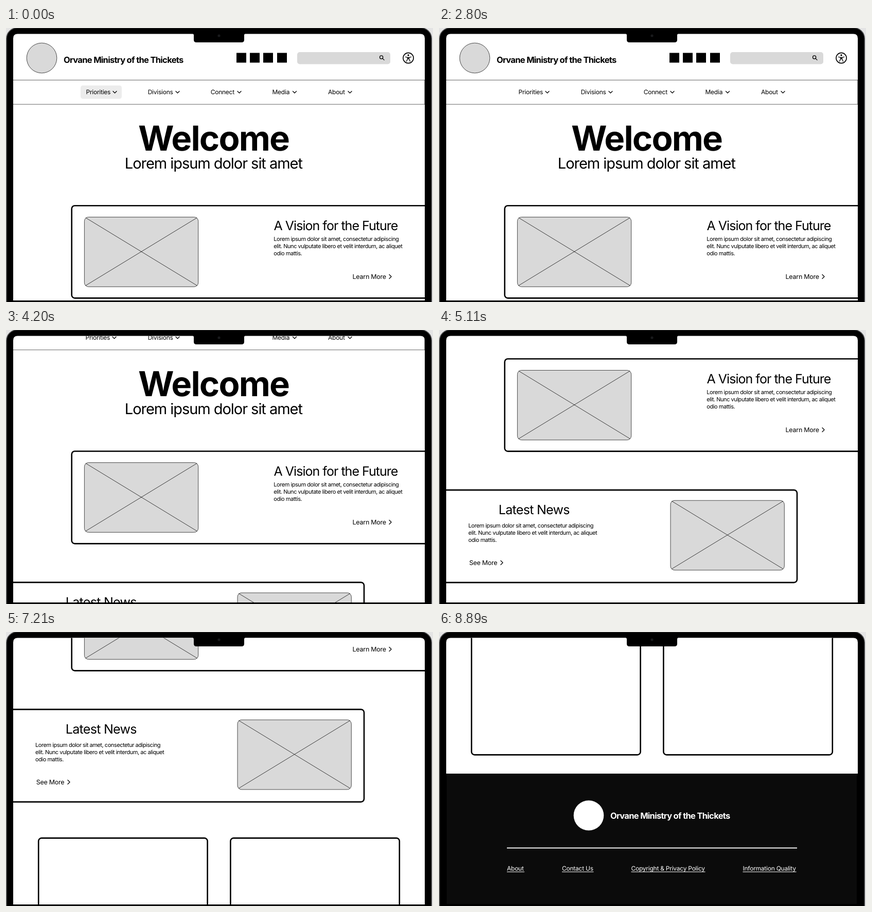
Write an HTML page that moves like this. It is 830 by 534 pixels and loops after 9.38 s.

```html
<!DOCTYPE html>
<html lang="en">
<head>
<meta charset="utf-8">
<title>Wireframe walkthrough</title>
<style>
  html, body { margin: 0; width: 100%; height: 100%; overflow: hidden; background: #e4e4e4; }
  svg { display: block; width: 830px; height: 534px; }
  text {
    font-family: Inter, "Liberation Sans", sans-serif; font-optical-sizing: none;
    text-rendering: geometricPrecision; white-space: pre;
  }
  .line { fill: none; stroke: #000; stroke-width: 1.3; stroke-linecap: round; stroke-linejoin: round; }
  .card { fill: #fff; stroke: #000; stroke-width: 2.6; }
  .thin { fill: #d9d9d9; stroke: #000; stroke-width: .7; }
</style>
</head>
<body>
<svg id="stage" viewBox="0 0 830 534">
  <defs>
    <clipPath id="screen"><path d="M14 531V20Q14 11.5 22.5 11.5H805.5Q814 11.5 814 20V531Z"/></clipPath>
  </defs>
  <rect x="1" y="-.3" width="826.2" height="580" rx="21" fill="#000" stroke="#4a4b4c" stroke-width="1.6"/>
  <g clip-path="url(#screen)">
    <rect x="14" y="11" width="800" height="520" fill="#fff"/>
    <g id="page"></g>
  </g>
  <path d="M363 11H465Q463 11.5 463 14V23Q463 28 458 28H370Q365 28 365 23V14Q365 11.5 363 11Z"/>
  <circle cx="414" cy="15" r="2.6" fill="#191a1c"/>
</svg>
<script>
const LOOP = 9380, TICK = 70;
const NAME = 'Orvane Ministry of the Thickets';
const page = document.getElementById('page');

function add(tag, attrs, parent = page, content = '') {
  const node = document.createElementNS('http://www.w3.org/2000/svg', tag);
  for (const key in attrs) node.setAttribute(key, attrs[key]);
  node.textContent = content;
  parent.appendChild(node);
  return node;
}

function label(x, y, size, content, { track = -.02, weight = 400, fill = '#000', parent = page } = {}) {
  return add('text', {
    x, y, fill, 'font-size': size, 'font-weight': weight, 'letter-spacing': track * size
  }, parent, content);
}

const box = (cls, x, y, width, height, rx) => add('rect', { class: cls, x, y, width, height, rx });
const stroke = (d, parent = page) => add('path', { class: 'line', d }, parent);

function placeholder(x, y) {
  box('thin', x, y, 221.3, 135.8, 8);
  add('path', {
    d: `M${x + 2.3} ${y + 1.2}L${x + 219} ${y + 133.5}M${x + 219} ${y + 1.2}L${x + 2.3} ${y + 133.5}`,
    stroke: '#000', 'stroke-width': .75
  });
}

function paragraph(x, y) {
  ['Lorem ipsum dolor sit amet, consectetur adipiscing',
   'elit. Nunc vulputate libero et velit interdum, ac aliquet',
   'odio mattis.'].forEach((line, i) => label(x, y + 14 * i, 11, line, { track: -.041 }));
}

function more(x, y, content, arrowX) {
  label(x, y, 12.5, content);
  stroke(`M${arrowX} ${y - 8.5}l4 4l-4 4`);
}

function header() {
  add('circle', { class: 'thin', cx: 69.5, cy: 58.5, r: 29.3 });
  label(112, 68, 16.5, NAME, { weight: 700, track: -.042 });
  for (const x of [448, 474, 500, 527]) add('rect', { x, y: 48.5, width: 19, height: 19 });
  add('rect', { x: 566, y: 47, width: 181, height: 23.5, rx: 5, fill: '#d9d9d9' });
  add('circle', { class: 'line', cx: 729.6, cy: 57, r: 3.1 });
  stroke('M732 59.4l3 3');
  add('circle', { class: 'line', cx: 782, cy: 58.5, r: 10.1, style: 'stroke-width:1.6' });
  add('circle', { cx: 782, cy: 53, r: 1.7 });
  stroke('M776.5 56.3l4 1h3l4 -1M780.5 57.5V60.5L778.5 65M783.5 57.5V60.5L785.5 65M782 57.5V60.5');
  add('rect', {
    x: 13.5, y: 101.4, width: 800.4, height: 47.4, fill: 'none', stroke: '#333', 'stroke-width': .75
  });
}

// Each menu item: label, text x, chevron x, and its highlight: in start, in end, out start, out end.
const menu = [
  ['Priorities', 154.5, 210.5, -2, -1, 0, 280],
  ['Divisions', 275.7, 333.5, 350, 560, 840, 1120],
  ['Connect', 397.7, 453.5, 1120, 1330, 1470, 1680],
  ['Media', 517.5, 561, 1610, 1820, 1960, 2170],
  ['About', 626, 668.5, 2240, 2450, 2590, 2800]
].map(([name, x, arrow, ...times]) => {
  const pill = add('rect', {
    x: x - 9.5, y: 112, width: arrow - x + 24, height: 26, rx: 4.5, fill: '#ececec'
  });
  const face = add('g', {});
  label(x, 129.3, 12, name, { parent: face });
  stroke(`M${arrow - 3.5} 123.3l3.5 3.5l3.5 -3.5`, face);
  return { pill, face, times };
});

function content() {
  label(257, 239, 67, 'Welcome', { weight: 700, track: -.027 });
  label(230.8, 274.3, 29, 'Lorem ipsum dolor sit amet', { track: -.036 });

  box('card', 127.7, 346.2, 760, 180.2, 6);
  placeholder(152.4, 368.5);
  label(520.5, 394.3, 25, 'A Vision for the Future', { track: -.039 });
  paragraph(520.3, 415.3);
  more(673.5, 489, 'Learn More', 745);

  box('card', -60, 601.9, 756, 180.2, 6);
  placeholder(450, 622.2);
  label(115.8, 649.3, 25, 'Latest News', { track: -.028 });
  paragraph(57, 675.3);
  more(58.7, 748, 'See More', 120);

  for (const x of [63.2, 436.4]) box('card', x, 852.6, 328.4, 234.8, 6);
}

function footer() {
  const white = { fill: '#fff' };
  add('rect', { x: 14, y: 1124, width: 800, height: 300 });
  add('rect', { x: 15, y: 1124, width: 797, height: 254, fill: '#0b0b0b' });
  add('circle', { cx: 291, cy: 1205.5, r: 29.3, fill: '#fff' });
  label(333, 1211.5, 16.5, NAME, { ...white, weight: 700, track: -.042 });
  add('rect', { x: 132, y: 1268, width: 564, height: 1.8, fill: '#fff' });
  for (const [x, width, name] of [
    [132, 34, 'About'], [239, 61.5, 'Contact Us'],
    [373.5, 144, 'Copyright & Privacy Policy'], [590.5, 104, 'Information Quality']
  ]) {
    label(x, 1313.3, 12, name, white);
    add('rect', { x, y: 1315, width, height: 1, fill: '#fff' });
  }
}

header();
content();
footer();

// Scroll gestures: first tick, last tick, resting offset.
const gestures = [
  [3150, 3640, 57], [4060, 4270, 113], [4550, 4550, 229], [4830, 4830, 234],
  [5110, 5250, 334], [5950, 5950, 336], [6160, 6510, 395], [7000, 7210, 451],
  [7910, 8260, 603], [8680, 8890, 848]
];

const clamp = v => Math.max(0, Math.min(1, v));

function scrollAt(t) {
  let offset = 0;
  for (const [start, end, target] of gestures) {
    const left = 1 - clamp((t - start + TICK) / (end - start + TICK));
    offset += (target - offset) * (1 - left * left);
  }
  return Math.round(offset);
}

function draw(time) {
  const t = Math.floor((time % LOOP) / TICK) * TICK;
  for (const { pill, face, times: [inA, inB, outA, outB] } of menu) {
    const glow = clamp((t - inA) / (inB - inA)) * (1 - clamp((t - outA) / (outB - outA)));
    pill.setAttribute('opacity', glow);
    face.setAttribute('transform', `translate(${glow} 0)`);
  }
  page.setAttribute('transform', `translate(0 ${-scrollAt(t)})`);
}

const begin = performance.now();
function frame() {
  draw(performance.now() - begin);
  requestAnimationFrame(frame);
}
frame();
</script>
</body>
</html>
```
